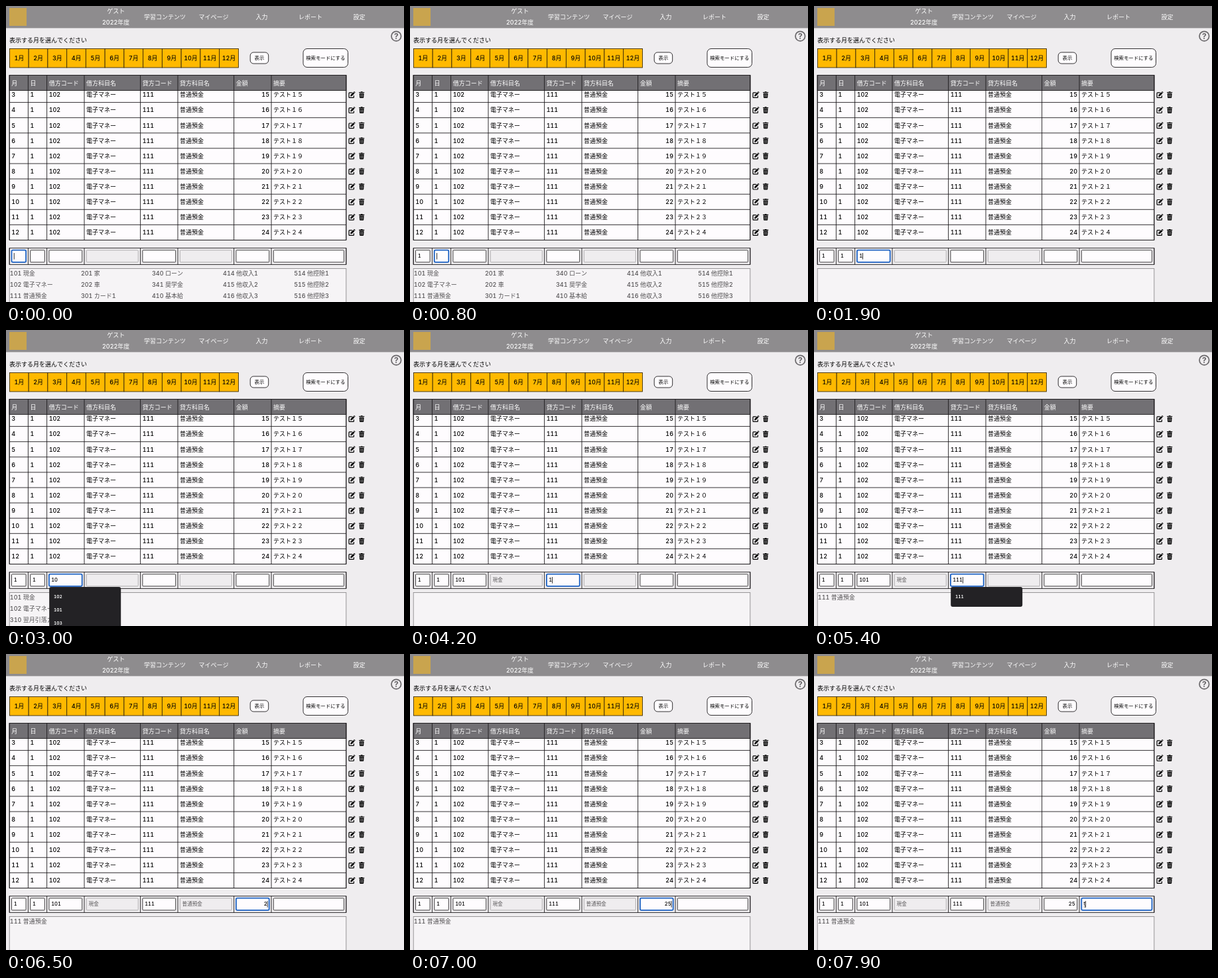
Recreate the animation shown at these times as an HTML page. Size 600 px wide and 447 px high, loop 8000 ms.

```html
<!DOCTYPE html>
<html lang="ja">
<head>
<meta charset="utf-8">
<title>仕訳入力</title>
<style>
html, body { margin: 0; width: 100%; height: 100%; overflow: hidden; background: #efedef; }
svg { display: block; width: 600px; height: 447px; }
text { font-family: Inter, "Noto Sans CJK JP", "Noto Sans CJK", sans-serif; font-variant-numeric: tabular-nums; font-kerning: none; white-space: pre; }
</style>
</head>
<body>
<svg id="stage" viewBox="0 0 600 447" xmlns="http://www.w3.org/2000/svg">
  <defs>
    <g id="edit">
      <path d="M5.6 1.7H1.7Q.8 1.7 .8 2.6V8.4Q.8 9.3 1.7 9.3H7.3Q8.2 9.3 8.2 8.4V6.2" fill="none" stroke="#000" stroke-width="1.2"/>
      <path d="M3 7.3L3.3 5.1L7.4 1L9.3 2.9L5.2 7ZM7.9 .5L8.4 .1Q8.9 -.2 9.4 .3L10.1 1Q10.5 1.5 10.1 1.9L9.7 2.4Z" fill="#000"/>
    </g>
    <g id="trash">
      <path d="M.3 .8H2.7L3.2 .1H5.5L6 .8H8.4V2H.3ZM.9 2.6H7.8L7.4 9.1Q7.3 9.9 6.5 9.9H2.2Q1.4 9.9 1.3 9.1Z" fill="#000"/>
      <path d="M2.8 3.8V8.7M4.35 3.8V8.7M5.9 3.8V8.7" stroke="#efedef" stroke-width=".5"/>
    </g>
  </defs>
</svg>
<script>
const NS = 'http://www.w3.org/2000/svg', LOOP = 8000;
const stage = document.getElementById('stage');

function el(tag, attrs, parent = stage) {
  const node = document.createElementNS(NS, tag);
  for (const k in attrs) node.setAttribute(k, attrs[k]);
  return parent.appendChild(node);
}
const rect = (x, y, w, h, fill, more, parent) =>
  el('rect', { x, y, width: w, height: h, fill, ...more }, parent);
const INK = { stroke: '#1c1a1c', 'stroke-width': .9 };
const line = d => el('path', { d, fill: 'none', ...INK });

// Text centred vertically on y.
function label(x, y, str, { size = 9, fill = '#000', anchor = 'start', weight = 500 } = {}, parent) {
  const t = el('text', { x, y: y + size * .36, 'font-size': size, fill, 'text-anchor': anchor, 'font-weight': weight }, parent);
  t.textContent = str;
  return t;
}
const mid = { anchor: 'middle' };

// Header
rect(0, 0, 600, 33.4, '#8e8c8e');
rect(5, 3, 26, 27, '#c9a44e');
[['ゲスト', 165.7, 8], ['2022年度', 165.7, 25], ['学習コンテンツ', 239.5, 16.3], ['マイページ', 313, 16.3],
 ['入力', 385.5, 16.3], ['レポート', 459, 16.3], ['設定', 532.5, 16.3]]
  .forEach(([s, x, y]) => label(x, y, s, { ...mid, fill: '#fff' }));

// Month picker and buttons
label(5, 51.4, '表示する月を選んでください');
for (let i = 0; i < 12; i++) {
  const x = 5.4 + i * 28.75;
  rect(x, 64.5, 28.75, 28.5, '#ffb900', { stroke: '#3a2c08', 'stroke-width': .9 });
  label(x + 14.4, 78.7, i + 1 + '月', mid);
}
function button(x, y, w, h, r, s) {
  rect(x, y, w, h, '#fefcfe', { rx: r, ...INK });
  label(x + w / 2, y + h / 2, s, { ...mid, size: 7.4 });
}
button(368.2, 70, 27.5, 17, 5, '表示');
button(448, 64.5, 67.5, 28, 6, '検索モードにする');
el('circle', { cx: 588.3, cy: 45.6, r: 7.3, fill: 'none', stroke: '#69676a', 'stroke-width': 1.7 });
label(588.3, 45.8, '?', { ...mid, size: 12, weight: 700, fill: '#69676a' });

// Ledger: column edges fall on multiples of one unit
const COLS = [0, 1, 2, 4, 7, 9, 12, 14, 18].map(k => 5.2 + k * 28.2);
const LEFT = COLS[0], RIGHT = COLS[8], WIDTH = RIGHT - LEFT, PITCH = 23.1;
const HEADS = ['月', '日', '借方コード', '借方科目名', '貸方コード', '貸方科目名', '金額', '摘要'];
const wide = n => String(n).replace(/\d/g, c => String.fromCharCode(c.charCodeAt(0) + 0xFEE0));
rect(LEFT, 104.5, WIDTH, 249, '#fefcfe', INK);
for (let m = 3; m <= 12; m++) {
  const bottom = 145.6 + (m - 3) * PITCH, y = bottom - 11.5, n = m + 12;
  line(`M${LEFT} ${bottom}H${RIGHT}`);
  [m, 1, 102, '電子マネー', 111, '普通預金', n, 'テスト' + wide(n)].forEach((v, i) =>
    i === 6 ? label(397, y, v, { anchor: 'end' }) : label(COLS[i] + 3.1, y, v));
  el('use', { href: '#edit', x: 516.2, y: y - 5 });
  el('use', { href: '#trash', x: 531.8, y: y - 5 });
}
rect(LEFT, 104.5, WIDTH, 23, '#727074', INK);
COLS.forEach(x => line(`M${x} 104.5V353.5`));
HEADS.forEach((s, i) => label(COLS[i] + 3.1, 116.4, s, { fill: '#fff' }));

// Entry row
rect(LEFT, 365.6, WIDTH, 24.8, '#efedef', INK);
COLS.forEach(x => line(`M${x} 365.6V390.4`));
const fields = COLS.slice(0, 8).map((c, i) => {
  const x = c + 3.3, w = COLS[i + 1] - c - 6.6, locked = i === 3 || i === 5;
  const box = rect(x, 368.7, w, 18.2, locked ? '#efedef' : '#fefcfe');
  const right = i === 6;
  const text = label(right ? x + w - 3 : x + 3.3, 377.6, '',
    { size: 7.6, fill: locked ? '#5c5a5c' : '#000', anchor: right ? 'end' : 'start' });
  return { x, w, right, locked, box, text };
});
const caret = rect(0, 373, .8, 9.6, '#000');
const underline = rect(406.8, 381.6, 3, .7, '#000');

// Account list and suggestion popup
rect(LEFT, 396.5, WIDTH, 60, '#f6f4f6', { stroke: '#8f8d8f', 'stroke-width': .9 });
const listLayer = el('g', {}), popLayer = el('g', {});

const LISTS = {
  none: [],
  all: ['101 現金,102 電子マネー,111 普通預金', '201 家,202 車,301 カード1', '340 ローン,341 奨学金,410 基本給',
    '414 他収入1,415 他収入2,416 他収入3', '514 他控除1,515 他控除2,516 他控除3'],
  one: ['101 現金,102 電子マネー,111 普通預金', '201 家,301 カード1,310 翌月引落', '341 奨学金,410 基本給,411 手当',
    '414 他収入1,415 他収入2,416 他収入3', '514 他控除1,515 他控除2,516 他控除3'],
  ten: ['101 現金,102 電子マネー,310 翌月引落カ'],
  cash: ['101 現金'],
  eleven: ['111 普通預金,112 定期預金,113 積立預金'],
  bank: ['111 普通預金']
};

// time, { focus, set: [field, value], list, pop: [field, codes] }
const STEPS = [
  [0, { focus: 0, list: 'all', pop: null }],
  [400, { set: [0, '1'] }],
  [800, { focus: 1 }],
  [1100, { set: [1, '1'] }],
  [1500, { focus: 2 }],
  [1800, { set: [2, '1'], list: 'none' }],
  [2000, { list: 'one' }],
  [2400, { set: [2, '10'], list: 'none', pop: [2, '102,101,103'] }],
  [2600, { list: 'ten' }],
  [3100, { set: [2, '101'], list: 'none', pop: [2, '101'] }],
  [3300, { list: 'cash' }],
  [3600, { focus: 4, set: [3, '現金'], pop: null }],
  [4100, { set: [4, '1'], list: 'none' }],
  [4300, { list: 'one' }],
  [4600, { set: [4, '11'], list: 'none', pop: [4, '111,112,113'] }],
  [5000, { list: 'eleven' }],
  [5200, { set: [4, '111'], list: 'none', pop: [4, '111'] }],
  [5400, { list: 'bank' }],
  [5700, { focus: 6, set: [5, '普通預金'], pop: null }],
  [6400, { set: [6, '2'] }],
  [6900, { set: [6, '25'] }],
  [7400, { focus: 7 }],
  [7800, { set: [7, 't'] }]
];

function stateAt(t) {
  const s = { values: Array(8).fill(''), touched: 0 };
  for (const [at, { set, ...rest }] of STEPS) {
    if (at > t) break;
    Object.assign(s, rest);
    if (set) s.values[set[0]] = set[1];
    if (set || 'focus' in rest) s.touched = at;
  }
  return s;
}

function paint(s) {
  fields.forEach((f, i) => {
    f.text.textContent = s.values[i];
    const on = i === s.focus;
    f.box.setAttribute('stroke', on ? '#1c62c4' : f.locked ? '#aaa8aa' : '#2c2a2c');
    f.box.setAttribute('stroke-width', on ? 1.8 : .9);
    f.box.setAttribute('rx', on ? 1.8 : 1);
  });
  const f = fields[s.focus];
  caret.setAttribute('x', f.right ? f.x + f.w - 3 : f.x + 3.3 + (s.values[s.focus] ? f.text.getComputedTextLength() : 0));
  underline.setAttribute('visibility', s.values[7] ? 'visible' : 'hidden');

  listLayer.replaceChildren();
  LISTS[s.list].forEach((col, c) => col.split(',').forEach((item, r) =>
    label(5.8 + c * 107.1, 404 + r * 16.7, item, { fill: '#555355' }, listLayer)));

  popLayer.replaceChildren();
  if (s.pop) {
    const x = fields[s.pop[0]].x + .3, codes = s.pop[1].split(',');
    rect(x, 388, 108, 10 + codes.length * 20, '#232225', { rx: 3 }, popLayer);
    codes.forEach((code, i) =>
      label(x + 6.8, 403 + i * 20, code, { size: 6.6, weight: 600, fill: '#fff' }, popLayer));
  }
}

let shown = '';
function frame() {
  const t = performance.now() % LOOP, s = stateAt(t), key = JSON.stringify(s);
  if (key !== shown) { paint(s); shown = key; }
  caret.setAttribute('visibility', Math.floor((t - s.touched) / 500) % 2 ? 'hidden' : 'visible');
  requestAnimationFrame(frame);
}
frame();
</script>
</body>
</html>
```
